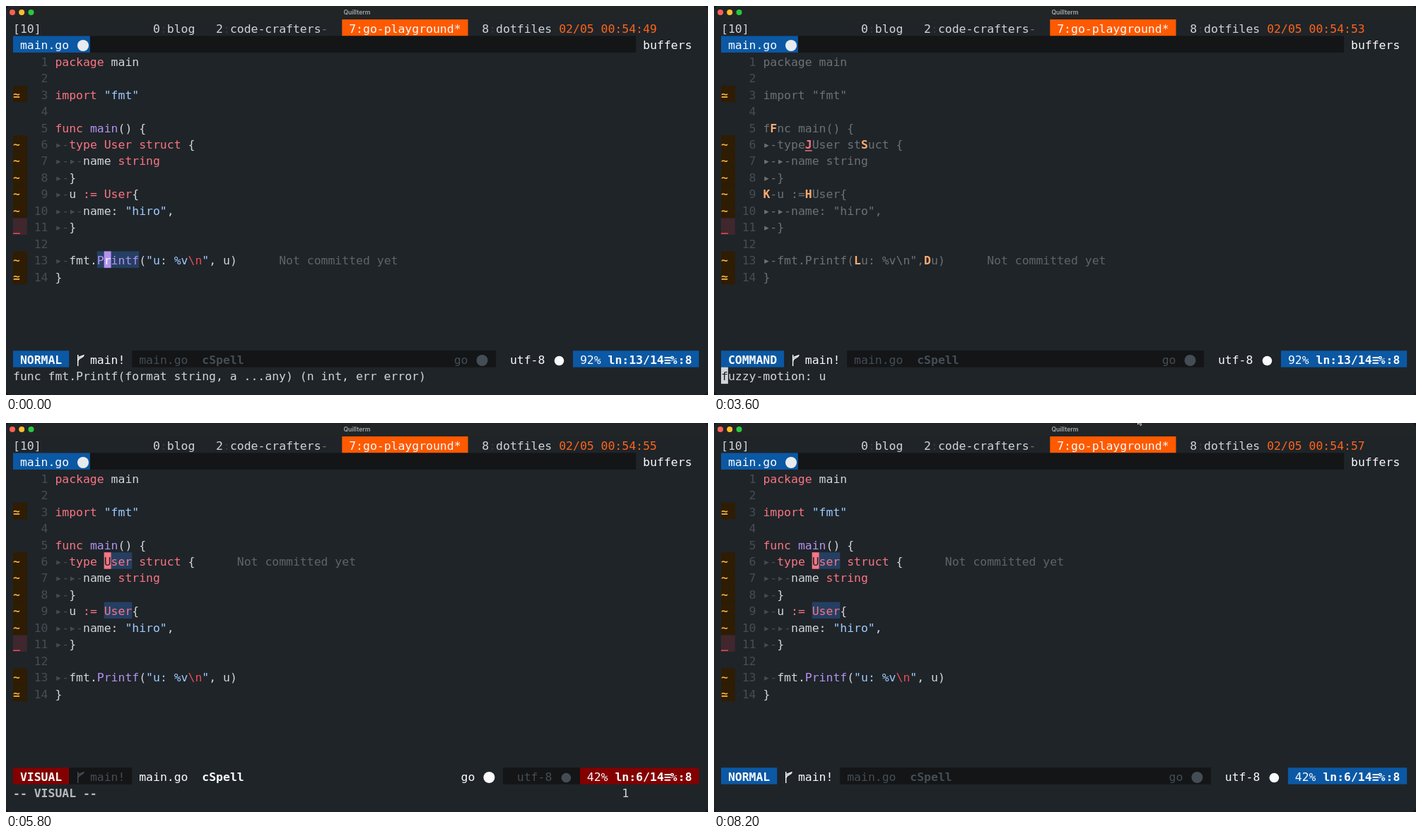
Write an HTML page that moves like this. It is 993x551 px and loops after 8400 ms.

```html
<!DOCTYPE html>
<html lang="en">
<head>
<meta charset="utf-8">
<title>Terminal</title>
<style>
html, body { margin: 0; width: 100%; height: 100%; overflow: hidden; background: #10171b; }
svg { display: block; }
text { font: 16.44px "DejaVu Sans Mono", monospace; white-space: pre; }
.b { font-weight: bold; }
.title { font: 600 8.6px Inter, sans-serif; }
</style>
</head>
<body>
<svg id="stage" width="993" height="551" viewBox="0 0 993 551"></svg>
<script>
const LOOP = 8400, STEP = 200;
const CW = 9.9, RH = 23.46, X0 = 10, Y0 = 19;
const BG = '#1f2428', DARK = '#131516', BLUE = '#0b58a4', RED = '#820000',
  WHITE = '#fafbfc', TEXT = '#d1d5da', DIM = '#444d56', GREY = '#6d7174',
  PINK = '#f97583', PURPLE = '#b392f0', ORANGE = '#ffab70', MARK = '#253f63';
const INK = { w: TEXT, k: PINK, f: PURPLE, s: '#9ecbff', e: '#ea4a5a', t: '#454c51' };

// One entry per line; each segment starts with its ink letter.
const CODE = String.raw`kpackage|w main

kimport|s "fmt"

kfunc|f main|w() {
t▸-|ktype User struct|w {
t▸-▸-|wname |kstring
t▸-|w}
t▸-|wu |k:= User|w{
t▸-▸-|wname: |s"hiro"|w,
t▸-|w}

t▸-|wfmt.|fPrintf|w(|s"u: %v|e\n|s"|w, u)
w}`.split('\n').map(l => l ? l.split('|').map(s => [s[0], s.slice(1)]) : []);

const SIGNS = { 3: '≃', 6: '~', 7: '~', 8: '~', 9: '~', 10: '~', 11: '_', 13: '~', 14: '≃' };
const HINTS = [['F', 7, 5], ['J', 12, 6], ['S', 20, 6], ['K', 6, 9], ['H', 12, 9], ['L', 19, 13], ['D', 29, 13]];

const x = col => X0 + col * CW;
const y = row => Y0 + row * RH;
const rect = (px, py, w, h, fill) => `<rect x="${px}" y="${py}" width="${w}" height="${h}" fill="${fill}"/>`;
const box = (col, row, n, fill) => rect(x(col), y(row), n * CW, RH, fill);
const put = (col, row, s, fill, bold) =>
  `<text x="${x(col)}" y="${y(row) + 18.8}" fill="${fill}"${bold ? ' class="b"' : ''}>${s}</text>`;
const dot = (px, py, r, fill) => `<circle cx="${px}" cy="${py}" r="${r}" fill="${fill}"/>`;

function header(clock) {
  return '<rect width="993" height="551" rx="7" fill="' + BG + '"/>' +
    '<path d="M0 18V7a7 7 0 0 1 7-7H986a7 7 0 0 1 7 7V18Z" fill="#222526"/>' +
    dot(9, 9, 4, '#ff5f57') + dot(22.2, 9, 4, '#febc2e') + dot(35.5, 9, 4, '#28c840') +
    '<text class="title" x="496.5" y="12" text-anchor="middle" fill="#a9abac">Quillterm</text>' +
    put(0, 0, '[10]', TEXT) +
    put(20, 0, '0', TEXT) + put(21, 0, ':', '#343a3e') + put(22, 0, 'blog', TEXT) +
    put(29, 0, '2', TEXT) + put(30, 0, ':', '#343a3e') + put(31, 0, 'code-crafters', TEXT) + put(44, 0, '-', GREY) +
    box(47, 0, 18, '#ff5a00') + put(48, 0, '7:go-playground*', WHITE) +
    put(67, 0, '8', TEXT) + put(68, 0, ':', '#343a3e') + put(69, 0, 'dotfiles', TEXT) +
    put(78, 0, '02/05 00:54:' + clock, '#ff641a') +
    box(0, 1, 11, BLUE) + put(1, 1, 'main.go', WHITE) + dot(109, 56, 8, '#e8ebee') +
    box(11, 1, 78, DARK) + put(90, 1, 'buffers', WHITE);
}

function editor(fuzzy, jumped, query) {
  let out = '';
  const mark = (col, line, n) => { out += box(col, line + 1, n, MARK); };
  if (!fuzzy) {
    if (jumped) { mark(13, 6, 4); mark(13, 9, 4); } else mark(12, 13, 6);
  }
  CODE.forEach((segs, i) => {
    const line = i + 1, row = i + 2, sign = SIGNS[line];
    if (sign) {
      const bad = sign === '_';
      out += box(0, row, 2, bad ? '#3f272d' : '#2e1c03') + put(0, row, sign, bad ? '#ea4a5a' : '#f5ae3d', true);
    }
    out += put(3, row, String(line).padStart(2), DIM);
    let col = 6;
    for (const [ink, s] of segs) {
      out += put(col, row, s, fuzzy ? GREY : INK[ink]);
      col += s.length;
    }
  });
  if (fuzzy) {
    if (query) for (const [c, col, line] of HINTS) {
      const best = c === 'J', ink = best ? PINK : ORANGE;
      out += box(col, line + 1, 1, BG) + put(col, line + 1, c, ink, true);
      if (best) out += rect(x(col), y(line + 1) + 21, CW, 1.4, ink);
    }
  } else {
    const row = jumped ? 7 : 14;
    out += box(13, row, 1, jumped ? PINK : PURPLE) + put(13, row, jumped ? 'U' : 'r', jumped ? BG : WHITE);
  }
  return out + put(jumped ? 32 : 38, jumped ? 7 : 14, 'Not committed yet', '#5f6468');
}

function status(mode, jumped) {
  const visual = mode === 'VISUAL', accent = visual ? RED : BLUE;
  const left = mode.length > 6 ? 1 : 0, right = jumped ? 1 : 0, r = 20;
  const width = mode.length + 2, end = 69 + right;
  const side = visual ? DIM : WHITE, mid = visual ? WHITE : DIM;
  const bx = x(width) + 12.5;
  return box(0, r, width, accent) + put(1, r, mode, WHITE, true) +
    (visual ? box(8, r, 9, DARK) + box(end, r, 11, DARK) : box(17 + left, r, end - 17 - left, DARK)) +
    `<path d="M${bx} 510V494M${bx} 504q0-4 4-5.5t4.500-4.500M${bx} 498l8-3" fill="none" stroke="${side}" stroke-width="1.4"/>` +
    put(11 + left, r, 'main!', side) +
    put(18 + left, r, 'main.go', mid) + put(27 + left, r, 'cSpell', mid, true) +
    put(63 + right, r, 'go', mid) + dot(673.5 + right * CW, 502, 8, mid) +
    put(71 + right, r, 'utf-8', side) + dot(782.5 + right * CW, 502.5, 6.8, side) +
    box(80 + right, r, 18 - right, accent) +
    put(81 + right, r, jumped ? '42%' : '92%', WHITE) +
    put(85 + right, r, jumped ? 'ln:6/14' : 'ln:13/14', WHITE, true) +
    put(93, r, '≡', WHITE, true) + put(93.9, r, '%', WHITE, true) + put(95, r, ':8', WHITE, true);
}

function message(t, fuzzy, visual, query) {
  if (fuzzy) return box(0, 21, 1, TEXT) + put(0, 21, 'f', BG) + put(1, 21, 'uzzy-motion: ' + query, TEXT);
  if (visual) return put(0, 21, '-- VISUAL --', '#b5babf', true) + put(87, 21, '1', TEXT);
  if (t < 3000) return put(0, 21, 'func fmt.Printf(format string, a ...any) (n int, err error)', TEXT);
  return t < 5600 ? put(0, 21, 'type User struct {', TEXT) : '';
}

function pointer(t) {
  if (t < 7200) return '';
  const p = (t - 7400) / 800;
  const px = 554.5 + 45 * p, py = 105.500 - 113 * p;
  return `<path transform="translate(${px} ${py})" d="M0 0V9.500L2.200 7.600L3.700 11L5.300 10.300L3.900 7H6.700Z" fill="#111" stroke="#eee" stroke-width=".9"/>`;
}

const stage = document.getElementById('stage');
let last = -1;

function draw(now) {
  const t = Math.floor(now % LOOP / STEP) * STEP;
  if (t !== last) {
    last = t;
    const fuzzy = t >= 3000 && t < 4000, jumped = t >= 4000;
    const visual = t >= 5600 && t < 6200, query = t >= 3400 ? 'u' : '';
    const mode = fuzzy ? 'COMMAND' : visual ? 'VISUAL' : 'NORMAL';
    stage.innerHTML = header(49 + Math.floor((t + 700) / 1000)) + editor(fuzzy, jumped, query) +
      status(mode, jumped) + message(t, fuzzy, visual, query) + pointer(t);
  }
}

let start;
function tick(now) {
  start ??= now;
  draw(now - start);
  requestAnimationFrame(tick);
}
draw(0);
requestAnimationFrame(tick);
</script>
</body>
</html>
```
